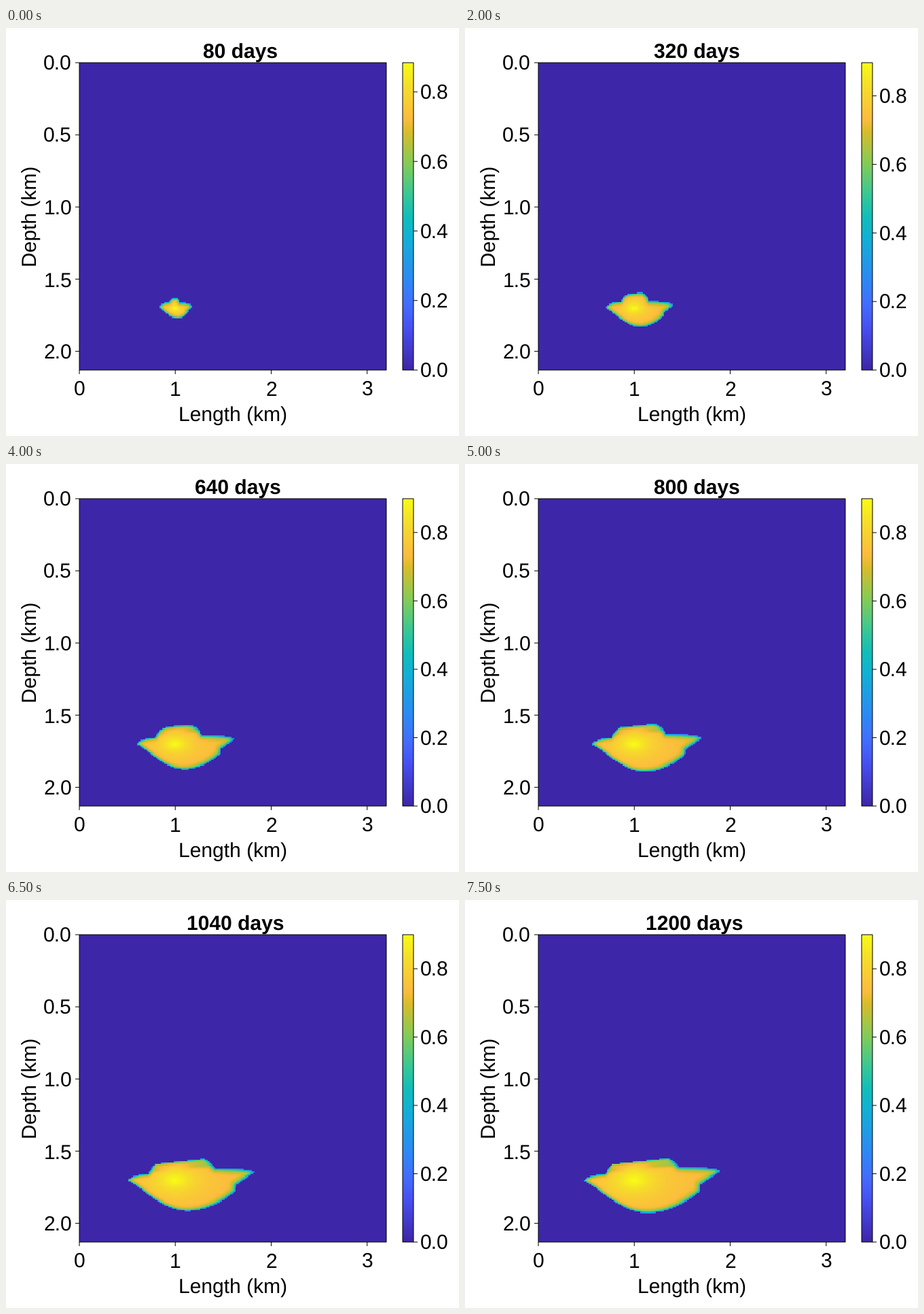
A matplotlib script that plays this animation: 667x600 px, repeating every 8 s.

```python
import numpy as np
import matplotlib.pyplot as plt
from matplotlib.animation import FuncAnimation
from matplotlib.colors import LinearSegmentedColormap
from matplotlib.path import Path

plt.rcParams.update({"font.family": "Liberation Sans", "text.hinting": "none"})

WIDTH, HEIGHT, DPI = 667, 600, 100
PX = 72 / DPI
FONT = 30 * PX
LEFT, RIGHT, TOP, BOTTOM = 108, 560, 51, 503
SIDE = RIGHT - LEFT
BAR_LEFT, BAR_RIGHT = 584, 600
WELL_X, WELL_Y = 249, 412
COLS, ROWS = 256, 213

PARULA = LinearSegmentedColormap.from_list("heat", [
    (0, "#3e26a8"), (0.14, "#4751f3"), (0.21, "#436dfe"), (0.29, "#2e88f6"),
    (0.43, "#11b1d6"), (0.5, "#12beb9"), (0.57, "#37c897"), (0.67, "#82cc58"),
    (0.78, "#dcbc29"), (0.82, "#fcbc3e"), (0.93, "#f5e028"), (1, "#f9fb15"),
], N=256)


def outline(step):
    """Closed plume boundary; every reach grows as a power of the time step."""
    reach_left = 23 * step ** 0.43
    reach_right = 25 * step ** 0.6
    dx = np.linspace(-reach_left, reach_right, 140)
    side = np.where(dx < 0, -dx / reach_left, dx / reach_right)
    tip = np.where(dx < 0, step / 8, -1 - reach_right ** 2 / 1330)

    # Wings: blunt tips that carry the plume sideways.
    wing_left = 9 * step ** 0.1 * np.sqrt(1 - side ** 4)
    wing_right = 6.5 * np.sqrt(1 - side ** 6)
    upper = tip - np.where(dx < 0, wing_left, wing_right)

    # Cap: a dome that flattens against the tilted rock above it.
    cap = np.where(dx < 0, -dx / (9.5 * step ** 0.57), dx / (7 * step ** 0.84))
    dome = 15 * step ** 0.28 * np.sqrt(np.clip(1 - cap ** 4, 0, 1))
    upper = np.where(cap < 1, np.minimum(upper, -0.11 * dx - np.minimum(27, dome)), upper)

    # Belly: round on the left, stepped under the right wing.
    middle = 0.16 * reach_right
    u = np.clip((middle - dx) / (middle + reach_left), 0, 1)
    v = np.clip((dx - middle) / (reach_right - middle), 0, 1)
    belly = np.where(dx < middle, (1 - u ** 2) ** 1.4,
                     np.where(v < 0.72, 1 - v ** 2, 1.2 * (1 - v)))
    base = np.where(dx < middle, step / 8, tip)
    lower = base + (15.5 * step ** 0.42 - base) * belly

    ring_x = np.concatenate([dx, dx[::-1]])
    ring_y = np.concatenate([upper, lower[::-1]])
    return np.column_stack([WELL_X + ring_x, WELL_Y + ring_y])


def depth_inside(points, curve):
    """Distance from each point to the curve, and whether it lies inside."""
    edge = np.roll(curve, -1, axis=0) - curve
    rel = points[:, None] - curve
    along = (rel * edge).sum(2) / np.maximum((edge ** 2).sum(1), 1e-9)
    gap = rel - np.clip(along, 0, 1)[..., None] * edge
    return np.sqrt((gap ** 2).sum(2).min(1)), Path(curve).contains_points(points)


xs = LEFT + (np.arange(COLS) + 0.5) * SIDE / COLS
ys = TOP + (np.arange(ROWS) + 0.5) * SIDE / ROWS
grid_x, grid_y = np.meshgrid(xs, ys)
active = (grid_x > 165) & (grid_x < 390) & (grid_y > 365) & (grid_y < 470)
cells = np.column_stack([grid_x[active], grid_y[active]])


def peak(step):
    return 0.901 - 0.017 / step


def saturation(step):
    dx, dy = (cells - (WELL_X, WELL_Y)).T
    depth, inside = depth_inside(cells, outline(step))

    # The front is sharp under the cap rock and softer to the right.
    late = np.clip((step - 8) / 7, 0, 1)
    cap_rock = np.exp(-((dy + 28 + 0.11 * dx) / 4) ** 2)
    softness = 2 + np.clip(dx / 80, 0, 1) - late * cap_rock
    front = inside * (1 - np.exp(-(depth + 0.9) / softness))

    radius = np.hypot(dx / (8 + 1.8 * step), dy / (6 + step))
    core = (peak(step) - 0.74) * np.exp(-radius ** 1.3)
    layer = np.exp(-((dy + 18 + 0.1 * dx) / 4) ** 2)
    away = 1 - np.exp(-(dx / 25) ** 2)
    plateau = 0.74 - 0.11 * min(step / 8, 1) * layer * away

    field = np.zeros((ROWS, COLS))
    field[active] = front * (plateau + core)
    return field


fig = plt.figure(figsize=(WIDTH / DPI, HEIGHT / DPI), dpi=DPI, facecolor="white")
ax = fig.add_axes([0, 0, 1, 1])
ax.axis("off")


def image(data, extent):
    return ax.imshow(data, cmap=PARULA, vmin=0, vmax=1, extent=extent,
                     aspect="auto", interpolation="nearest")


def line(x, y):
    return ax.plot(x, y, color="black", lw=PX, solid_capstyle="butt",
                   solid_joinstyle="miter", snap=False, zorder=3)[0]


def label(x, y, text, ha="center", **kw):
    return ax.text(x, y, text, ha=ha, va="baseline", fontsize=FONT, color="black", **kw)


def frame_box(x0, x1):
    line([x0, x1, x1, x0, x0], [TOP, TOP, BOTTOM, BOTTOM, TOP])


plume = image(np.zeros((ROWS, COLS)), (LEFT, RIGHT, BOTTOM, TOP))
image(np.linspace(1, 0, 256)[:, None], (BAR_LEFT, BAR_RIGHT, BOTTOM, TOP))
frame_box(LEFT, RIGHT)
frame_box(BAR_LEFT, BAR_RIGHT)

for km in range(4):
    x = LEFT + km * SIDE / 3.2
    line([x, x], [BOTTOM, BOTTOM + 6])
    label(x, 541, str(km))
for km in np.arange(0, 2.1, 0.5):
    y = TOP + km * SIDE / 2.13
    line([LEFT - 6, LEFT], [y, y])
    label(97, y + 11, f"{km:.1f}", ha="right")

label(334.3, 578, "Length (km)")
label(44.5, 277, "Depth (km)", rotation=90, rotation_mode="anchor")
title = label(290, 44, "", ha="left", weight="bold")

bar_values = np.arange(5) * 0.2
bar_ticks = [line([BAR_RIGHT, BAR_RIGHT + 6], [BOTTOM, BOTTOM]) for _ in bar_values]
bar_labels = [label(610, BOTTOM + 11, f"{v:.1f}", ha="left") for v in bar_values]

ax.set_xlim(0, WIDTH)
ax.set_ylim(HEIGHT, 0)


def update(frame):
    step = max(1, frame)
    days = str(80 * step)
    title.set_text(f"{days} days")
    title.set_x(290.3 - 12.3 * (len(days) - 2))
    plume.set_data(saturation(step) / peak(step))
    for value, tick, text in zip(bar_values, bar_ticks, bar_labels):
        y = BOTTOM - value / peak(step) * SIDE
        tick.set_ydata([y, y])
        text.set_y(y + 11)
    return [plume, title, *bar_ticks, *bar_labels]


anim = FuncAnimation(fig, update, frames=16, interval=500, repeat=True,
                     repeat_delay=0, blit=False)
plt.show()
```
